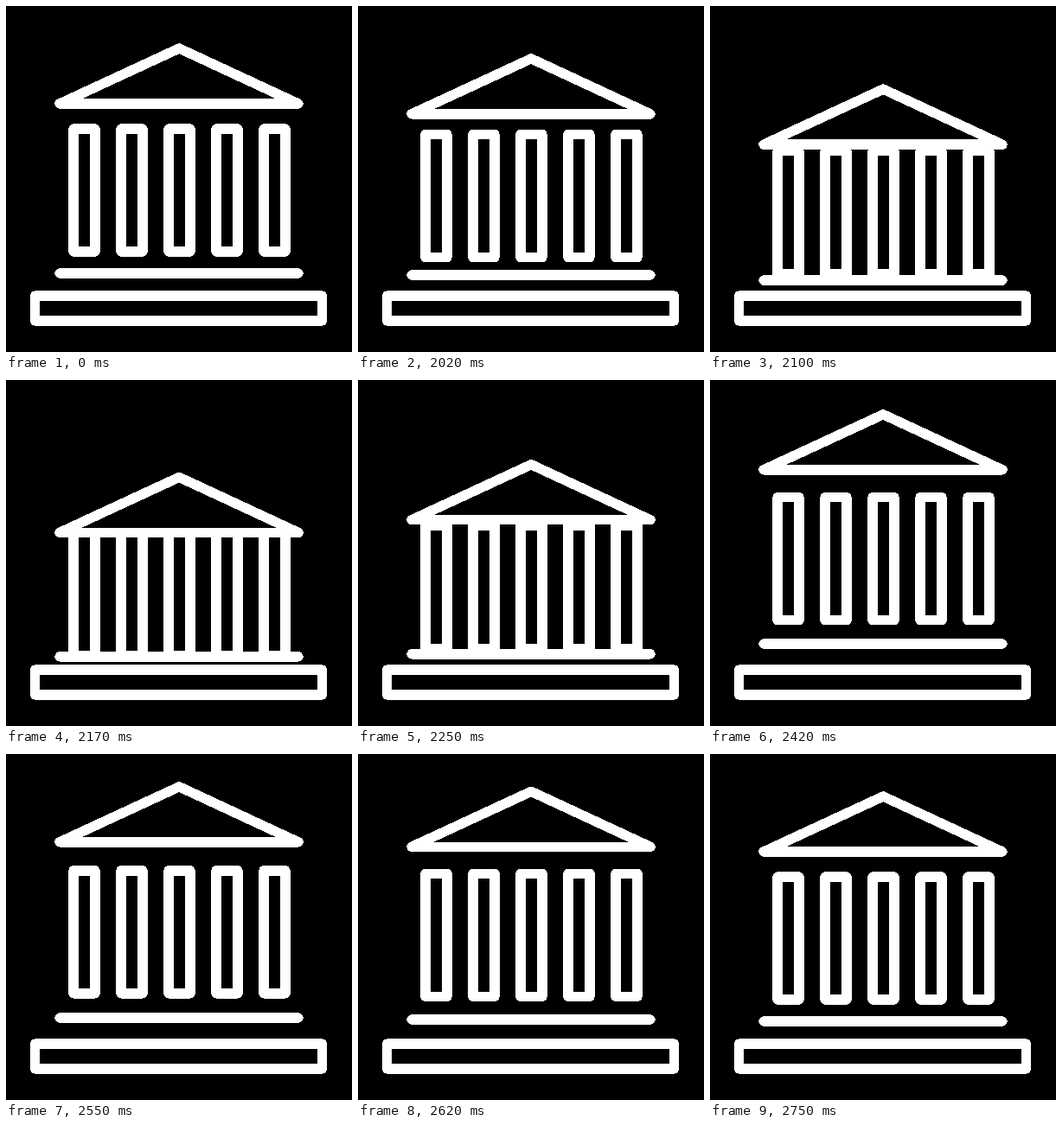
Write an HTML page that moves like this. It is 400 px wide and 400 px high and loops after 2.77 s.

```html
<!DOCTYPE html>
<html lang="en">
<head>
<meta charset="utf-8">
<title>Columned building</title>
<style>
  html, body { margin: 0; width: 100%; height: 100%; overflow: hidden; background: #000; }
  svg { display: block; width: 100vw; height: 100vh; }
  g {
    fill: none; stroke: #fff; stroke-width: 11.4;
    stroke-linecap: round; stroke-linejoin: round; shape-rendering: crispEdges;
  }
</style>
</head>
<body>
<svg viewBox="0 0 400 400">
  <g>
    <path id="roof" d="M62 113 L200.2 49 L338 113 Z"/>
    <path id="columns"/>
    <path id="step" d="M62 309 H338"/>
    <path d="M33.7 335 H365.3 V364 H33.7 Z"/>
  </g>
</svg>
<script>
  const LOOP = 2770, START = 2025, FRAME = 25;

  // How far each part drops in the squash and rises in the stretch
  const PARTS = [
    { id: "roof", drop: 64, rise: 14 },
    { id: "columns", drop: 35, rise: 9 },
    { id: "step", drop: 11, rise: 5 }
  ];
  for (const part of PARTS) part.el = document.getElementById(part.id);

  PARTS[1].el.setAttribute("d",
    Array.from({ length: 5 }, (_, i) => `M${78 + 55 * i} 142 h25 v142 h-25 Z`).join(" "));

  // Sine ease from 0 to 1 between two times
  function ease(t, from, to) {
    const x = Math.min(Math.max((t - from) / (to - from), 0), 1);
    return (1 - Math.cos(Math.PI * x)) / 2;
  }

  // The picture advances every 25 ms, at whole hundredths of a second
  function frameTime(time) {
    return Math.floor((Math.floor(time / 10) * 10 + 5) / FRAME) * FRAME;
  }

  function draw(time) {
    const t = frameTime(time);
    const squash = ease(t, 1968, 2169), stretch = ease(t, 2157, 2476), settle = ease(t, 2465, 2750);
    for (const { el, drop, rise } of PARTS) {
      const y = t < START ? 0 : drop * (squash - stretch) - rise * (stretch - settle);
      el.setAttribute("transform", `translate(0 ${y.toFixed(2)})`);
    }
  }

  const begin = performance.now();
  function tick() {
    draw((performance.now() - begin) % LOOP);
    requestAnimationFrame(tick);
  }
  tick();
</script>
</body>
</html>
```
